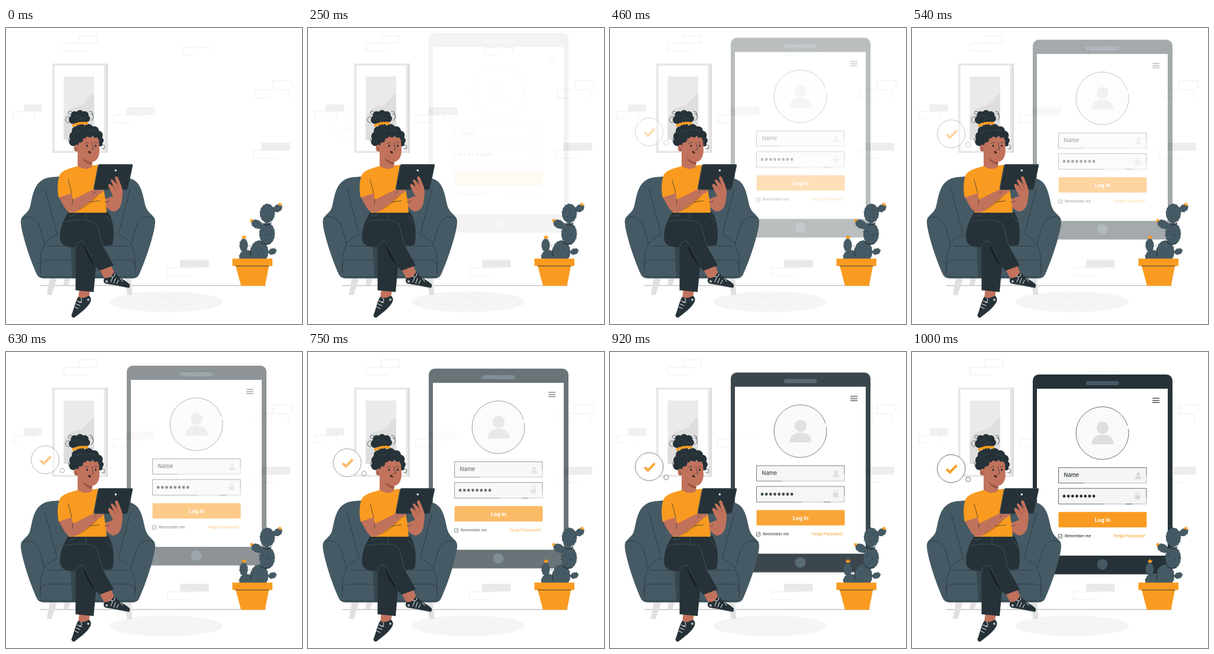
Write an HTML page without scripts that moves like this. It is 500 px wide and 500 px high and loops after 1040 ms.

```html
<!DOCTYPE html>
<html lang="en">
<head>
<meta charset="utf-8">
<title>Log in</title>
<style>
html, body { margin: 0; width: 100%; height: 100%; overflow: hidden; background: #fff; }
svg { display: block; width: 100vw; height: 100vh; }
path, line { fill: none; stroke-linecap: round; stroke-linejoin: round; }
text { font-family: Inter, "Open Sans", sans-serif; font-weight: 450; }
.dark { fill: #263238; }
.slate { fill: #455a64; }
.orange { fill: #f99b20; }
.skin { fill: #c1725c; }
.shade { fill: #9c5442; }
.pale { fill: #e0e0e0; }
.white { fill: #fff; }
.ink { stroke: #263238; stroke-width: .7; }
.lace { stroke: #fff; stroke-width: 1; }
.brick { stroke: #e6e6e6; stroke-width: .7; }
.spine ellipse { fill: #455a64; stroke: #263238; stroke-width: 2.2; stroke-dasharray: .6 6; }
.drop { animation: drop 1040ms infinite; }
@keyframes drop {
  0% { opacity: 0; transform: translateY(-32px); animation-timing-function: step-end; }
  19.52% { opacity: .004; transform: translateY(-31.5px); animation-timing-function: steps(19, end); }
  95.67%, 100% { opacity: 1; transform: none; }
}
</style>
</head>
<body>
<svg viewBox="0 0 500 500">
  <defs>
    <g id="user">
      <circle cy="-9" r="10.2"/>
      <path style="fill:inherit" d="M-18.500 19C-18.500 7-10 2.500 0 2.500S18.500 7 18.500 19Z"/>
    </g>
    <path id="flower" class="orange" d="M-2.500 3L-4 -2L-1.500 -.5L0 -4L1.500 -.5L4.500 -2L2.500 3Z"/>
  </defs>

  <!-- Wall -->
  <g class="brick">
    <path d="M124 25V13H154V25H147M98 39V26H146M98 39H135"/>
    <path d="M298 46V33H324M330 33H346V39M298 46H319"/>
    <path d="M451 103V89H483V103M422 118V104H477V118M422 118H446"/>
    <path d="M12 153V141H48V152M12 153H24"/>
    <path d="M182 160V147H231V153M182 160H208"/>
    <path d="M418 220V207H467M418 220H457"/>
    <path d="M273 418V405H322M273 418H309"/>
  </g>
  <rect x="30" y="129" width="31" height="12" fill="#f0f0f0"/>
  <rect x="203.500" y="134" width="48.500" height="13" fill="#f2f2f2"/>
  <rect x="431.500" y="194" width="48.500" height="13" fill="#ededed"/>
  <rect x="294" y="391.500" width="48.500" height="13" fill="#e9e9e9"/>

  <rect x="78" y="60" width="94" height="151" fill="#e8e8e8"/>
  <rect x="169" y="60" width="3" height="151" fill="#dcdcdc"/>
  <rect x="82" y="63.500" width="83.500" height="144" fill="#fff"/>
  <rect x="97.500" y="82" width="51.500" height="107" fill="#eaeaea"/>
  <path style="fill:#dedede" d="M97.500 189V152C104 138 110 134 122 132C136 130 138 114 149 111V189Z"/>

  <!-- Floor -->
  <ellipse cx="270.500" cy="462.500" rx="95.500" ry="17.500" fill="#f5f5f5"/>
  <g fill="none" stroke="#ebebeb" stroke-width=".7" stroke-dasharray="50 9">
    <ellipse cx="265" cy="462" rx="45" ry="9"/>
    <ellipse cx="265" cy="462" rx="28" ry="5"/>
  </g>
  <path d="M58 435H439" stroke="#a6a6a6" stroke-width="1"/>

  <!-- Sliding screen -->
  <g class="drop">
    <rect class="dark" x="204" y="38" width="236" height="337.500" rx="10"/>
    <rect class="white" x="211" y="62" width="221" height="282"/>
    <rect class="slate" x="294" y="49" width="55.500" height="7" rx="3.500"/>
    <circle class="slate" cx="321.500" cy="358.700" r="9"/>
    <path d="M406.500 78.200H417.500M406.500 81.800H417.500M406.500 85.400H417.500" stroke="#263238" stroke-width="1.200"/>
    <circle cx="321.500" cy="137" r="44.500" fill="#fafafa"/>
    <circle class="ink" cx="321.500" cy="137" r="44.500" fill="none" stroke-dasharray="266 6 8 0"/>
    <use href="#user" x="322" y="137" fill="#dedede"/>

    <g fill="#f5f5f5">
      <rect x="247.500" y="195.300" width="148.500" height="26"/>
      <rect x="247.500" y="230.300" width="148.500" height="26.500"/>
    </g>
    <g class="ink">
      <path d="M289 221.300H247.500V195.300H396V208"/>
      <path d="M323 256.800H247.500V230.300H396V246M361 256.800H372"/>
      <path d="M289 221.300H396V208M323 256.800H396V246" opacity=".45"/>
    </g>
    <text class="dark" x="256.500" y="210.700" font-size="9.200">Name</text>
    <use href="#user" transform="translate(382 209) scale(.29)" fill="#d8d8d8"/>
    <path d="M257 243.500H308" stroke="#263238" stroke-width="4.800" stroke-dasharray="0 7.160"/>
    <rect x="376.500" y="241.700" width="9" height="7" rx="1" fill="#d8d8d8"/>
    <path d="M378.500 241.700V239.700A2.500 2.500 0 0 1 383.500 239.700V241.700" stroke="#d8d8d8" stroke-width="1.300"/>

    <rect class="orange" x="247.500" y="270.300" width="149" height="26" rx="1.500"/>
    <text class="white" x="322" y="286.500" font-size="9" text-anchor="middle" style="font-weight:700">Log In</text>
    <rect class="ink" x="247.300" y="308.100" width="6.200" height="6.200" fill="#fff"/>
    <path class="ink" d="M248.800 311.100L250.200 312.600L252.600 309.600"/>
    <text class="dark" x="258" y="313.400" font-size="6.400">Remember me</text>
    <text class="orange" x="341" y="313.400" font-size="6.200">Forgot Password?</text>

    <g class="ink" fill="#fff">
      <circle cx="66.300" cy="197" r="23.600"/>
      <circle cx="94.800" cy="215.200" r="4"/>
    </g>
    <path d="M58.500 198L64 203.300L75.500 191.500" stroke="#f99b20" stroke-width="4" style="stroke-linecap:butt;stroke-linejoin:miter"/>
  </g>

  <!-- Plant -->
  <g class="spine">
    <ellipse cx="441.500" cy="313" rx="12.500" ry="16"/>
    <ellipse cx="459" cy="304.500" rx="8" ry="6" transform="rotate(-30 459 304.500)"/>
    <ellipse cx="424" cy="331.500" rx="10" ry="7" transform="rotate(25 424 331.500)"/>
    <ellipse cx="441" cy="347.500" rx="13" ry="18.500"/>
    <ellipse cx="401.500" cy="367" rx="7" ry="11"/>
    <ellipse cx="450" cy="377.500" rx="7" ry="5" transform="rotate(-20 450 377.500)"/>
    <ellipse cx="406" cy="387" rx="12" ry="12"/>
    <ellipse cx="428" cy="378" rx="15" ry="19"/>
  </g>
  <path d="M434 330Q441 336 448 329M430 361Q438 369 447 363M414 384Q411 378 414 373" stroke="#263238" stroke-width="1.200"/>
  <path d="M436 305v2m8 0v2m-5 9v2m7-1v2m-11 21v2m8 4v2m-6 7v2m8-10v2m-22 21v2m9-1v2m-6 8v2m-14-18v2m1 7v2" stroke="#263238" stroke-width=".6"/>
  <use href="#flower" x="402" y="353"/>
  <use href="#flower" transform="translate(463 297.500) rotate(30) scale(.85)"/>
  <use href="#flower" transform="translate(414.500 325) rotate(-45) scale(.8)"/>
  <path class="orange" d="M387.500 400H444.500L437.500 435.500H397Z"/>
  <rect class="orange" x="382.500" y="389.500" width="67.500" height="12.500"/>
  <path d="M388 402H444" stroke="#263238" stroke-width=".9"/>

  <!-- Armchair -->
  <path class="pale" d="M74 421H87L77 451H69ZM99 421H110L105 434H97ZM199 421H211L213.500 451H205Z"/>
  <path class="slate" d="M40 304C45 290 44 255 76 252C115 248 170 249 208 254C232 258 231 290 237 304C241 314 252 317 252 327C252 343 237 390 225 416Q222 423 214 423H64Q55 423 52 416C40 390 25 343 25 327C25 317 36 314 40 304Z"/>
  <g class="ink">
    <path d="M26 322C42 313 55 326 58 339L65 366Q57 380 58 400V415M251 322C235 313 223 324 219 339L211 366Q219 380 218 400V415"/>
    <path d="M66 272L86 347M210 272L190 347M65 364Q74 352 88 349M211 364Q202 354 190 349M70 368.500H206"/>
    <path d="M58 404Q58 392 68 392H208Q218 392 218 404M58 420H218"/>
  </g>
  <path style="fill:#37474f" d="M109 368H122V422H112Z"/>

  <!-- Legs -->
  <path class="skin" d="M124 440L142 443L139 460L122 457ZM157 406L177 400L185 418L167 425Z"/>
  <path class="dark" d="M122 454Q130 459 140 452Q145 456 143 462C138 473 126 481 116 489Q111 490 110.500 485C115 475 116 464 122 454Z"/>
  <path class="dark" d="M166 422Q176 424 182 413Q186 413 188 418C195 424 203 427 209 433Q210 439 206 439C194 437 182 434 168 432Q163 429 166 422Z"/>
  <path d="M143 463C138 473 126 481 116 489M168 432C182 434 194 437 206 439" stroke="#d5d9db" stroke-width=".7"/>
  <path class="lace" d="M120 461L128 464M118 466L125 469M116 471L122 474M126 456Q131 461 124 464M180 422L177 429M185 423L182 431M190 426L187 432M176 419Q183 424 184 415M193 423L197 428"/>
  <circle cx="139" cy="459" r="2" fill="#b8bec1"/>
  <circle cx="170" cy="428" r="2" fill="#b8bec1"/>
  <path class="dark" d="M106 310H172C180 320 185 344 180 366Q172 369 163 367L182 401L158 410L152 403L148 446L117.500 443V370C105 371 93 368 91.500 357C90 342 96 324 106 310Z"/>
  <path d="M100 327C122 322 147 323 154 333L163 367M118 370Q119 359 130 360L152 403M170 318L179 329M135 312V322M107 317Q116 319 119 312" stroke="#63717a" stroke-width=".5"/>
  <path style="fill:#172126" d="M131 363L155 409L150 401C141 393 133 380 131 363Z"/>

  <!-- Upper body -->
  <path class="skin" d="M165 290L180 284L186 288L197 273Q196 290 195 295C193 305 187 310 180 310Q171 306 165 297Z"/>
  <path class="orange" d="M122 233C108 237 94 240 90 250C86 262 87 277 89 287L104 283L106 312H170L168 290L158 231L146 232Z"/>
  <path style="fill:#cf7f18" d="M114 312C130 307 146 295 158 280L152 281L112 306Z"/>
  <path class="skin" d="M90 286L111 279L113 290L151 271L164 272Q166 278 158 280C143 292 128 306 116 311Q106 313 101 306C97 300 93 294 90 286Z"/>
  <path class="ink" d="M105 256Q108 268 111 279M113 289L112 298M141 294L158 292M152 276L148 280M167 293Q172 297 174 291"/>
  <path class="skin" d="M121 202L146 220L145 235Q134 242 121 233Z"/>
  <path class="shade" d="M129 219Q138 226 146 227L145 231Q133 229 129 219Z"/>

  <!-- Tablet -->
  <path style="fill:#37474f" d="M158 230H212Q215 230 214 233L206 271Q205 273.500 203 273.500H150Q147.500 273 148 270L155 233Q156 230 158 230Z"/>
  <path class="dark" d="M159 231.500H211Q214 231 213 234L205.500 270Q205 272.500 202 272.500H152Q149 272.500 149.500 269L156.500 234Q157 231.500 159 231.500Z"/>
  <circle class="white" cx="185.300" cy="240.500" r="1.700"/>
  <path class="skin" d="M183 288L174 270Q171 264 175 263L182 268L177 258Q177 254 181 257L188 264L184 254Q185 248 189 252L195 267Q198 276 196 288Z"/>
  <path d="M180 267L187 274M185 261L190 270" stroke="#8a4738" stroke-width=".7"/>

  <!-- Head -->
  <g class="dark">
    <circle cx="113" cy="155" r="7"/>
    <circle cx="116" cy="147" r="6.500"/>
    <circle cx="125" cy="145" r="6.500"/>
    <circle cx="133" cy="147" r="6.500"/>
    <circle cx="136" cy="153" r="6"/>
    <circle cx="125" cy="155" r="11"/>
    <circle cx="119" cy="174" r="8"/>
    <circle cx="115" cy="183" r="8"/>
    <circle cx="114" cy="192" r="7.500"/>
    <circle cx="126" cy="171" r="9"/>
    <circle cx="139" cy="171" r="9"/>
    <circle cx="149" cy="174" r="8"/>
    <circle cx="156" cy="181" r="7.500"/>
    <circle cx="159" cy="190" r="6"/>
    <circle cx="159" cy="196" r="4"/>
    <circle cx="133" cy="180" r="11"/>
    <circle cx="121" cy="194" r="8"/>
  </g>
  <path d="M114 164.500Q125 159 137 161" stroke="#f99b20" stroke-width="5" stroke-dasharray="0 4.600"/>
  <path d="M114 164.500Q125 159 137 161" stroke="#f99b20" stroke-width="3"/>
  <path class="ink" d="M106 160C98 160 99 149 107 150M109 147C102 143 106 138 112 142M143 145C149 144 149 154 144 156M141 141Q148 140 146 147M109 193C103 194 105 184 109 185M163 198C168 196 168 203 164 203M161 203Q164 207 167 203"/>
  <path d="M113 153Q118 145 126 150M121 157Q128 149 135 154M117 178Q124 170 131 174M138 173Q147 170 152 177" stroke="#596970" stroke-width=".4"/>
  <path class="skin" d="M122 197C125 188 130 184 135 183C142 185 148 184 153 182L157 190L158 206C158 218 153 226 145 226C135 225 127 218 122 209Z"/>
  <ellipse class="skin" cx="119" cy="203" rx="4.500" ry="6"/>
  <g class="dark">
    <circle cx="132" cy="182" r="4.500"/>
    <circle cx="142" cy="180" r="5"/>
    <circle cx="151" cy="181" r="4.500"/>
    <circle cx="125" cy="188" r="5.500"/>
    <ellipse cx="137" cy="199" rx="1.400" ry="1.900"/>
    <ellipse cx="151.500" cy="199" rx="1.400" ry="1.900"/>
    <path style="fill:#4c2a27" d="M138 209Q141 205 144 211Q141 214 138 209Z"/>
  </g>
  <path class="ink" d="M133 195Q136 192 139 194M149 194Q152 192 154 194M145 194L148 205L144.500 206M118 202Q120 204 119 207"/>
</svg>
</body>
</html>
```
